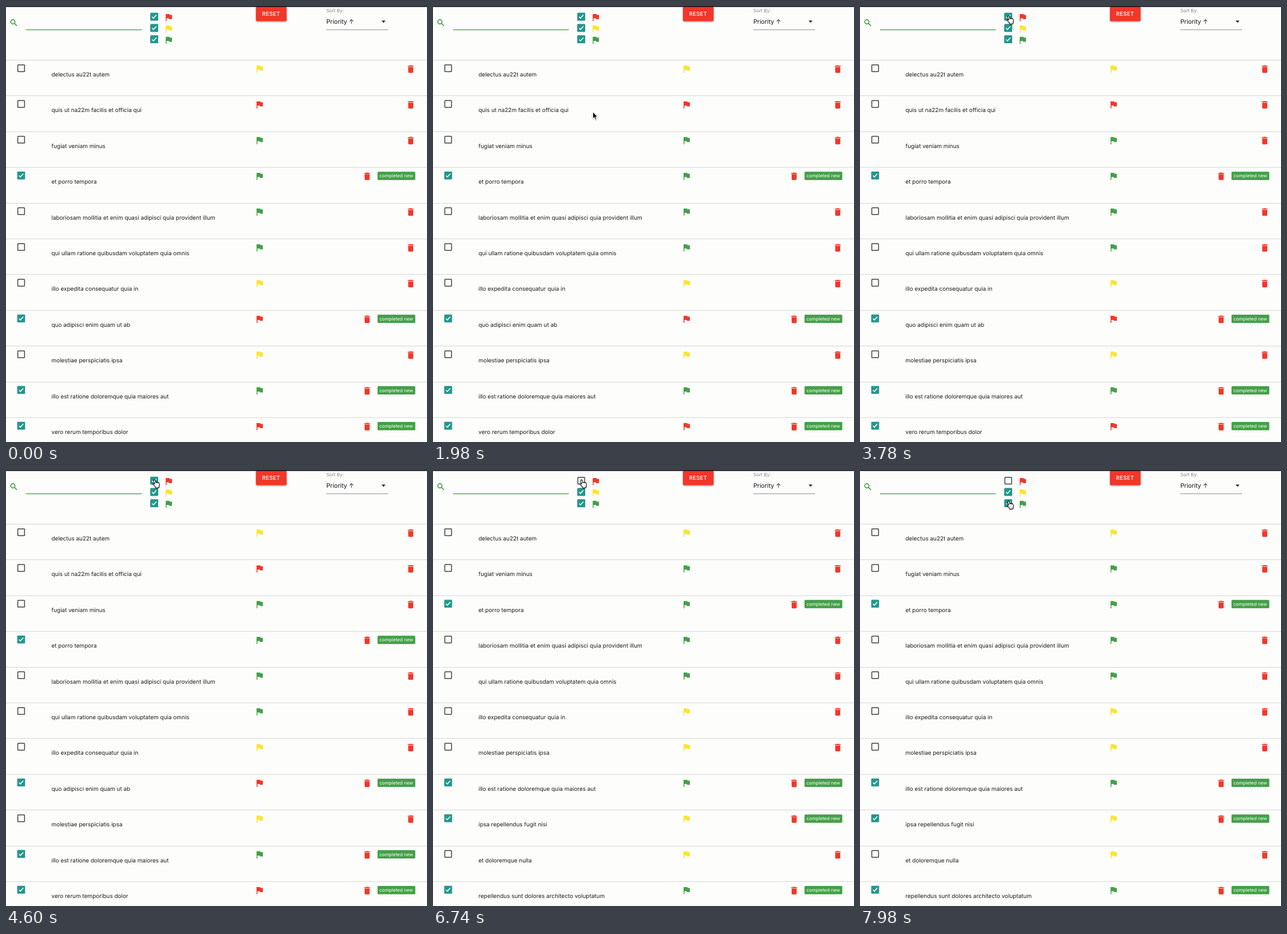
An HTML page that plays this animation: 736x761 px, repeating every 8000 ms.

```html
<!DOCTYPE html>
<html lang="en">
<head>
<meta charset="utf-8">
<title>Todo list filter</title>
<style>
  html, body { margin: 0; width: 100%; height: 100%; overflow: hidden; background: #fdfdfc; }
  svg { display: block; }
  text { font-family: Inter, sans-serif; font-size: 9.95px; fill: #1c1c1c; text-rendering: geometricPrecision; }
  .badge { font-size: 8.1px; fill: #fff; }
  .reset { font-size: 9.6px; font-weight: 500; letter-spacing: .25px; fill: #fff; }
  .label { font-size: 8.2px; fill: #858585; }
  .value { font-size: 10.7px; fill: #111; }
  .button { fill: #f23629; filter: drop-shadow(0 1px 1.5px rgba(0, 0, 0, .4)); }
  .pointer { filter: drop-shadow(0 1px 1px rgba(0, 0, 0, .3)); }
</style>
</head>
<body>
<svg width="736" height="761" viewBox="0 0 736 761">
  <defs>
    <path id="flag" d="M14.4 6 14 4H5v17h2v-7h5.6l.4 2h7V6z" transform="scale(.73)"/>
    <path id="trash" fill="#f23629" transform="scale(.73)"
      d="M6 19c0 1.1.9 2 2 2h8c1.1 0 2-.9 2-2V7H6zM19 4h-3.5l-1-1h-5l-1 1H5v2h14z"/>
    <rect id="off" x="-5.9" y="-5.9" width="11.8" height="11.8" rx=".8" fill="#fdfdfc" stroke="#414141" stroke-width="1.5"/>
    <g id="on">
      <rect x="-6.9" y="-6.9" width="13.8" height="13.8" rx="1.2" fill="#23978c"/>
      <path d="M-3.8 .2-1.4 2.7 3.7-3" fill="none" stroke="#fff" stroke-width="1.5"/>
    </g>
  </defs>

  <rect width="736" height="761" fill="#fdfdfc"/>
  <g fill="none" stroke="#43a047" stroke-width="1.7">
    <circle cx="12" cy="27.6" r="3.7"/>
    <path d="M14.8 30.4 19 34.6"/>
    <path d="M35 41.5H237.5" stroke="#4caf50" stroke-width="1.5"/>
  </g>
  <rect class="button" x="437" y="1" width="53.5" height="25.5" rx="2"/>
  <text class="reset" x="447.7" y="17.3">RESET</text>
  <text class="label" x="560" y="11">Sort By:</text>
  <text class="value" x="560" y="31">Priority ↑</text>
  <path d="M656.5 25.5h7L660 29.2z" fill="#222"/>
  <path d="M560 41.5H668" stroke="#929292"/>
  <rect width="736" height="1.7" fill="#15151c"/>

  <g id="filters"></g>
  <g id="all"></g>
  <g id="filtered"></g>

  <g id="cursor">
    <path id="arrow" class="pointer" fill="#000" stroke="#fff" stroke-width=".9" stroke-linejoin="round"
      d="M0 0V11.6L2.7 9.1 4.5 13.2 6.4 12.4 4.7 8.4H8.2z"/>
    <path id="hand" class="pointer" transform="translate(-4 -1)" fill="#fff" stroke="#111" stroke-width="1.1" stroke-linejoin="round"
      d="M3.2 1.2c-1.2.3-1.2 1.3-.9 2.2l1.9 5.2-1.6-1c-1.2-.6-2 .6-1.1 1.5l4.3 4.9.6 1.8 5.2-1.4.1-2c.6-1.6.6-4-.2-5.8-.5-1-1.6-.9-1.8-.2-.4-1-1.6-.9-2-.2-.4-.9-1.5-.8-1.8 0L4.9 2c-.3-.8-1-1-1.7-.8z"/>
  </g>
</svg>
<script>
const LOOP = 8000, LIST_FILTERED = 5300, BOX_CLEARED = 5720;
const ROW_HEIGHT = 62.4, VISIBLE_ROWS = 11;
const colors = { red: '#f23629', yellow: '#fbe42f', green: '#43a047' };

const todos = [
  ['delectus au22t autem', 'yellow'],
  ['quis ut na22m facilis et officia qui', 'red'],
  ['fugiat veniam minus', 'green'],
  ['et porro tempora', 'green', true],
  ['laboriosam mollitia et enim quasi adipisci quia provident illum', 'green'],
  ['qui ullam ratione quibusdam voluptatem quia omnis', 'green'],
  ['illo expedita consequatur quia in', 'yellow'],
  ['quo adipisci enim quam ut ab', 'red', true],
  ['molestiae perspiciatis ipsa', 'yellow'],
  ['illo est ratione doloremque quia maiores aut', 'green', true],
  ['vero rerum temporibus dolor', 'red', true],
  ['ipsa repellendus fugit nisi', 'yellow', true],
  ['et doloremque nulla', 'yellow'],
  ['repellendus sunt dolores architecto voluptatum', 'green', true],
];

// Pointer waypoints: time, x, y
const route = [
  [1200, 300, 775], [1900, 279.5, 185], [2400, 279.5, 185], [3060, 245, 68],
  [3200, 245, 68], [3800, 260, 17], [6900, 260, 17], [7600, 260, 54],
];

const $ = id => document.getElementById(id);
const use = (id, x, y, fill = '') => `<use href="#${id}" x="${x}" y="${y}" fill="${fill}"/>`;
const show = (element, visible) => element.setAttribute('visibility', visible ? 'visible' : 'hidden');

function row([title, color, done], index) {
  const y = index * ROW_HEIGHT;
  const badge = done ? `<rect x="649.5" y="${y + 102}" width="66" height="14.5" rx="1.5" fill="${colors.green}"/>
    <text class="badge" x="653" y="${y + 112.2}">completed new</text>` : '';
  return `<path d="M0 ${Math.round(94 + y) + .5}H736" stroke="#d6d6d2"/>
    ${use(done ? 'on' : 'off', 26.5, y + 108.6)}
    <text x="79.5" y="${y + 123}">${title}</text>
    ${use('flag', 434.4, y + 101.1, colors[color])}
    ${use('trash', done ? 622.6 : 698.8, y + 101.3)}${badge}`;
}

const rows = list => list.slice(0, VISIBLE_ROWS).map(row).join('');
$('all').innerHTML = rows(todos);
$('filtered').innerHTML = rows(todos.filter(todo => todo[1] !== 'red'));
$('filters').innerHTML = Object.values(colors).map((color, i) => {
  const y = 18.6 + i * 19.8;
  return use('off', 259.2, y) + `<g class="tick">${use('on', 259.2, y)}</g>` + use('flag', 275.6, y - 7.4, color);
}).join('');
const redTick = document.querySelector('.tick');

function pointerAt(time) {
  const next = route.findIndex(point => point[0] > time);
  if (next < 0) return route[route.length - 1].slice(1);
  const [t0, x0, y0] = route[next - 1] || route[0];
  const [t1, x1, y1] = route[next];
  const p = t1 > t0 ? (time - t0) / (t1 - t0) : 0;
  const eased = p * p * (3 - 2 * p);
  return [x0 + (x1 - x0) * eased, y0 + (y1 - y0) * eased];
}

function draw(now) {
  const time = now % LOOP;
  const [x, y] = pointerAt(time);
  const overBox = x > 252 && y < 64;
  $('cursor').setAttribute('transform', `translate(${x} ${y})`);
  show($('hand'), overBox);
  show($('arrow'), !overBox);
  show($('all'), time < LIST_FILTERED);
  show($('filtered'), time >= LIST_FILTERED);
  show(redTick, time < BOX_CLEARED);
  requestAnimationFrame(draw);
}
draw(performance.now());
</script>
</body>
</html>
```
